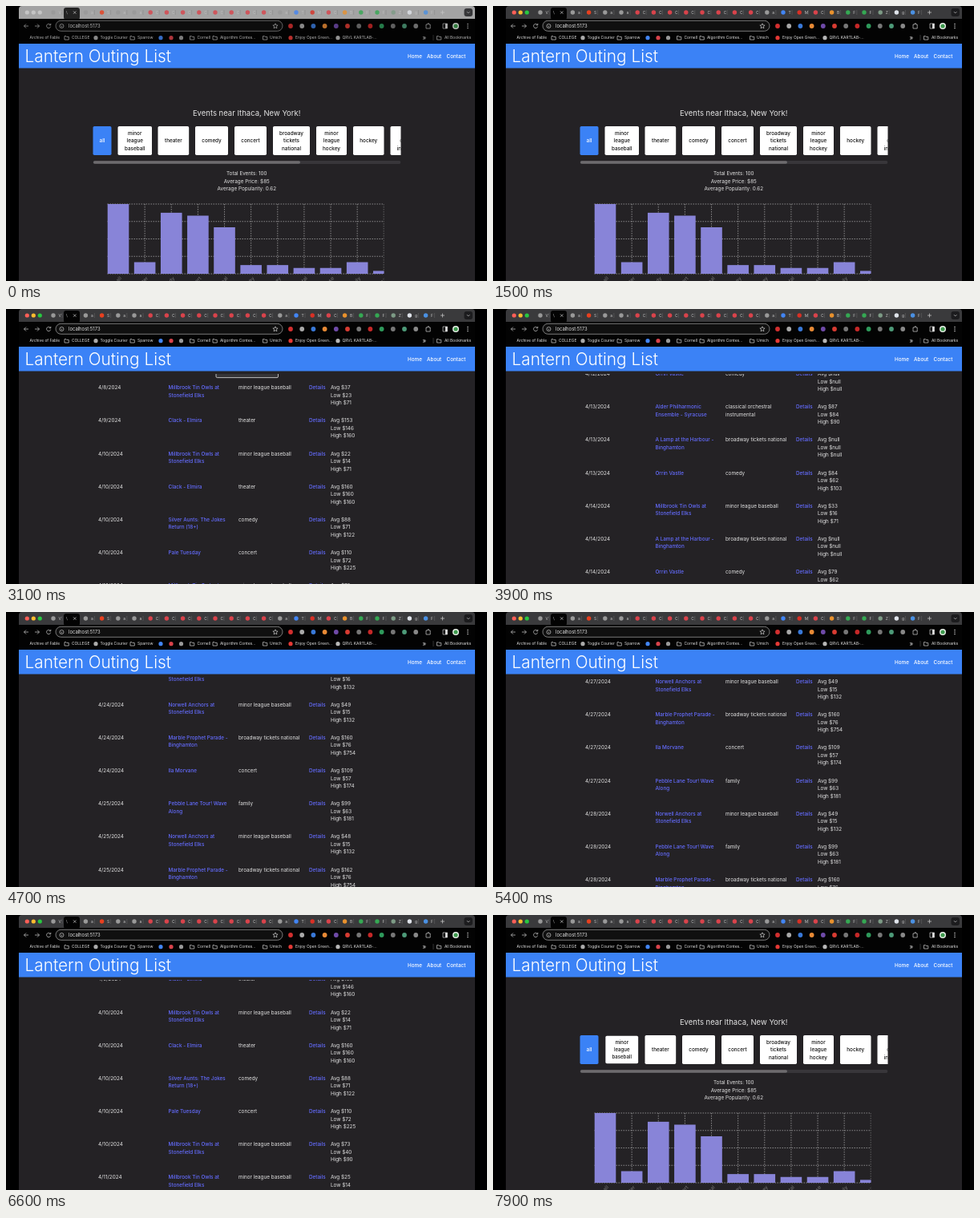
These frames come from a looping animation (600 px wide and 343 px high, 8 s). An HTML page:

```html
<!DOCTYPE html>
<html lang="en">
<head>
<meta charset="utf-8">
<title>Event list</title>
<style>
html, body { margin: 0; width: 100%; height: 100%; overflow: hidden; background: #000; }
svg { display: block; font: 6.33px Inter, "Open Sans", sans-serif; fill: #e4e4e4; }
text { white-space: pre; }
.link { fill: #646cff; font-weight: 500; }
.tile text { fill: #111; font-weight: 500; }
.line { fill: none; stroke: #d0d0d0; stroke-width: .7; }
.small { font-size: 4.9px; }
.tab { font-size: 4.9px; fill: #c4c4c4; }
</style>
</head>
<body>
<svg id="stage" width="600" height="343" viewBox="0 0 600 343"></svg>
<script>
const rect = (x, y, w, h, fill, more = '') =>
  `<rect x="${x}" y="${y}" width="${w}" height="${h}" fill="${fill}" ${more}/>`;
const dot = (x, y, r, fill) => `<circle cx="${x}" cy="${y}" r="${r}" fill="${fill}"/>`;
const text = (x, y, s, more = '') => `<text x="${x}" y="${y}" ${more}>${s}</text>`;
const path = (d, more = 'class="line"') => `<path d="${d}" ${more}/>`;
const mid = 'text-anchor="middle"';

// Browser window
function tabs() {
  const colors = ('#999 #111 #999 #e8401f #999 #999 ' + '#d9434b '.repeat(8) +
    '#999 #4285f4 #d93025 #d9434b #e8912d #35a853 #35a853 #7d9b86 #dfe3ea #4a90e2').split(' ');
  const letters = 'V aSaaCCCCCCCCaTMCBFFZgF';
  let s = rect(72, 2, 20, 15, '#030303', 'rx="3"');
  colors.forEach((c, i) => {
    const x = 59 + i * 20.2;
    if (i === 1) s += text(75, 10, '\\', 'class="tab"') + path('M84 6.4l3.4 3.4m0-3.4l-3.4 3.4');
    else s += dot(x, 8, 2.7, c) + text(x + 6.5, 9.8, letters[i], 'class="tab"') +
      path(`M${x + 11} 5v6`, 'stroke="#777" stroke-width=".4"');
  });
  return s + path('M542 8h5m-2.5-2.5v5') + rect(571.5, 3, 10.5, 10, '#1c1c1e', 'rx="3"') +
    path('M575 7.2l1.7 1.7 1.7-1.7');
}

function toolbar() {
  let s = path('M28 25h-5.5m2.5-2.5L22.5 25l2.5 2.5M36 25h5.5m-2.5-2.5l2.5 2.5-2.5 2.5M55.4 23.6a2.6 2.6 0 1 0 .3 2M55.8 21.8v2h-2') +
    rect(62, 18.3, 283, 13, '#101010', 'rx="6.5" stroke="#aaa" stroke-width=".7"') +
    '<circle class="line" cx="69.5" cy="25" r="2.5"/>' + path('M69.5 24.6v1.8') +
    text(78, 27, 'localhost:5173', 'style="font-size:5.9px"') +
    path('M336 21.8l.9 2.1 2.2.2-1.7 1.5.5 2.2-1.9-1.2-1.9 1.2.5-2.2-1.7-1.5 2.2-.2z');
  '#d32f2f #a9a9a9 #3979d8 #e88a35 #6f4aa8 #d83b32 #777 #c62828 #2e9a5b #777 #4d9a78 #888'
    .split(' ').forEach((c, i) => s += dot(355 + i * 14.2, 25, 2.9, c));
  return s + path('M524 23h2v-1.2h1.5V23h1.7v5H524zM545 22h5.5v6H545z') +
    rect(548, 22, 2.5, 6, '#ddd') + dot(561, 25, 4, '#e9efe8') + dot(561, 25, 2.6, '#3f9b4f') +
    [22.5, 25, 27.5].map(y => dot(576, y, .7, '#eee')).join('');
}

function bookmarks() {
  const items = [[29.5, 'Archive of Fable'], [82, 'COLLEGE', 73], [117.5, 'Toggle Courier'], [164, 'Sparrow', 155],
    [238.5, 'Cornell', 229.5], [267, 'Algorithm Contes...', 258], [329, 'Umich', 320.5],
    [361, 'Enjoy Open Green...'], [419.5, 'QRVL KARTLAB-...'], [547, 'All Bookmarks', 537.5]];
  return items.map(([x, s, folder]) => text(x, 41.4, s, 'class="small"') +
      (folder ? path(`M${folder} 37.6h2l.7.9h2.6v3.5h-5.3z`) : '')).join('') +
    [[112, '#aaa'], [193, '#4285f4'], [206, '#d9434b'], [218.5, '#999'], [355, '#e53935'], [414, '#b7b7b7']]
      .map(([x, c]) => dot(x, 39.7, 2.6, c)).join('') +
    text(519.5, 41.7, '»', 'style="font-size:8px"') + path('M533 36v7', 'stroke="#666" stroke-width=".5"');
}

// Page
const tile = (x, w, label, i) => {
  const lines = label.split('|');
  const c = x + w / 2;
  return `<g class="tile" id="tile${i}">` + rect(x, 150, w, 36, i ? '#fff' : '#3b82f6', 'rx="1.8"') +
    lines.map((s, k) => text(c, 170.2 + (k - (lines.length - 1) / 2) * 9.5, s,
      mid + (i ? '' : ' style="fill:#fff"'))).join('') + '</g>';
};

const tiles = () => [[108.5, 23, 'all'], [139.5, 42.5, 'minor|league|baseball'], [189.5, 38.7, 'theater'],
  [236, 41, 'comedy'], [285, 40, 'concert'], [333, 46, 'broadway|tickets|national'],
  [387, 38, 'minor|league|hockey'], [433, 38.5, 'hockey'], [479.5, 54, 'classical|orchestral|instrumental']]
  .map((t, i) => tile(...t, i)).join('');

function chart() {
  const counts = [24, 4, 21, 20, 16, 3, 3, 2, 2, 4, 1];
  const names = ['minor league baseball', 'theater', 'comedy', 'concert', 'broadway tickets national',
    'minor league hockey', 'hockey', 'classical orchestral instrumental', 'lacrosse', 'family', 'classical'];
  const center = i => 140 + i * 33.13;
  let grid = '', bars = '', labels = '';
  for (let k = 0; k < 5; k++) grid += `M126.5 ${247 + k * 21.75}H471.5`;
  counts.forEach((n, i) => {
    const x = center(i), h = n * 3.625;
    grid += `M${x} 247v87`;
    bars += rect(x - 13.3, 334 - h, 26.6, h, '#8884d8');
    labels += text(0, 0, names[i], `transform="translate(${x + 4.5} 340) rotate(-45)" text-anchor="end" fill="#777"`);
  });
  return `<g clip-path="url(#plot)">` +
    path(grid, 'fill="none" stroke="#ccc" stroke-width=".6" stroke-dasharray="1.5 1.5"') + bars + labels + '</g>';
}

const elks = ' at|Stonefield Elks';
const shows = {
  W: ['Millbrook Tin Owls' + elks, 'minor league baseball', '25 14 71'],
  S: ['Clack - Elmira', 'theater', '160 160 160'],
  G: ['Silver Aunts: The Jokes|Return (18+)', 'comedy', '88 71 122'],
  B: ['Pale Tuesday', 'concert', '110 72 225'],
  A: ['Orrin Vastle', 'comedy', '84 62 103'],
  C: ['Alder Philharmonic|Ensemble - Syracuse', 'classical orchestral|instrumental', '87 84 90'],
  P: ['A Lamp at the Harbour -|Binghamton', 'broadway tickets national', 'null null null'],
  R: ['The Vintage Riff Night', 'concert', '113 74 210'],
  D: ['Linden Foxtails at Gravel|Otters', 'minor league baseball', '47 19 100'],
  M: ['Toby Marellane', 'comedy', '112 78 168'],
  Z: ['Clive Harrowgate and|the Night Wagon', 'concert', '678 210 960'],
  K: ['Norwell Anchors' + elks, 'minor league baseball', '49 15 132'],
  J: ['Marble Prophet Parade -|Binghamton', 'broadway tickets national', '160 76 754'],
  I: ['Ila Morvane', 'concert', '109 57 174'],
  T: ['Pebble Lane Tour! Wave|Along', 'family', '99 63 181']
};
// One group of shows per day, starting on April 8
const days = 'W S WSGBW WSA WSPA CPA WPA DPM RP DP DMZ DMR DTC DJB KJR JIMK KJI TKJ KJT KJIT KTJM KJR KJI'.split(' ');
const prices = { 0: '37 23 71', 1: '153 146 160', 2: '22 14 71', 6: '73 40 90', 13: 'null null null',
  17: '33 16 71', 19: '79 62 103', 27: '47 18 100', 45: '50 16 132', 50: '48 15 132', 51: '162 76 754' };
const firstRow = 420, rowHeight = 41.17;

function table() {
  let i = 0, s = rect(262, firstRow - 27, 77.5, 14.6, '#353437', 'rx="1.5" stroke="#ddd" stroke-width=".8"');
  days.forEach((day, d) => [...day].forEach(key => {
    const y = firstRow + 2.2 + i * rowHeight;
    const [name, kind, cost] = shows[key];
    const lines = (x, list, more) => list.map((v, k) => text(x, y + k * 9.5, v, more)).join('');
    const labels = ['Avg', 'Low', 'High'];
    s += text(115, y, `4/${d + 8}/2024`) + lines(202.5, name.split('|'), 'class="link"') +
      lines(290, kind.split('|')) + text(378, y, 'Details', 'class="link"') +
      lines(405, (prices[i] || cost).split(' ').map((v, k) => `${labels[k]} $${v}`));
    i++;
  }));
  return s;
}

const stage = document.getElementById('stage');
stage.innerHTML = `<defs>
  <clipPath id="view"><rect x="16" y="81" width="569" height="262"/></clipPath>
  <clipPath id="strip"><rect x="108" y="140" width="384.5" height="60"/></clipPath>
  <clipPath id="plot"><rect x="126" y="240" width="345.5" height="150"/></clipPath></defs>` +
  rect(0, 0, 600, 343, '#000') +
  rect(16, 0, 569, 30, '#3a3a3c', 'id="bar" rx="4"') + rect(16, 16, 569, 31, '#030303') +
  [0, 1, 2].map(i => `<circle class="light" cx="${26.3 + i * 8}" cy="8" r="2.6"/>`).join('') +
  `<g id="chrome">${tabs()}${toolbar()}${bookmarks()}</g>` +
  rect(16, 47, 569, 296, '#242225') + rect(16, 47, 569, 30.5, '#3b82f6') +
  text(23.5, 70.2, 'Lantern Outing List', 'style="font-size:20.8px;font-weight:300" fill="#fff"') +
  [[501, 'Home'], [525, 'About'], [549.5, 'Contact']]
    .map(([x, s]) => text(x, 64.8, s, 'font-weight="500" fill="#fff"')).join('') +
  '<g clip-path="url(#view)"><g id="page">' +
  text(300.2, 137.4, 'Events near Ithaca, New York!', mid + ' style="font-size:9.5px"') +
  `<g clip-path="url(#strip)">${tiles()}` + rect(108.5, 193, 384, 4, '#38363a', 'rx="2"') +
  rect(109, 193.3, 258, 3.4, '#6d6b6e', 'rx="1.7"') + '</g>' +
  ['Total Events: 100', 'Average Price: $85', 'Average Popularity: 0.62']
    .map((s, i) => text(300.3, 211.3 + i * 9.5, s, mid)).join('') +
  chart() + table() + '</g></g>';

// Scroll position: monotone cubic through [time, offset]
const rowAt = (i, y) => firstRow + i * rowHeight - y;
const keys = [[0, 0], [2600, 0], [2700, 9.5], [3100, rowAt(0, 98)], [3900, rowAt(14, 122)],
  [4700, rowAt(46, 115.5)], [5250, 2680], [6100, rowAt(23, 92)], [7000, 0], [8000, 0]];
const slope = i => keys[i + 1] ? (keys[i + 1][1] - keys[i][1]) / (keys[i + 1][0] - keys[i][0]) : 0;
const tangent = i => {
  const a = i ? slope(i - 1) : 0, b = slope(i);
  return a * b > 0 ? 2 * a * b / (a + b) : 0;
};
function scrollAt(t) {
  const i = keys.findLastIndex(k => k[0] <= t), [t0, a] = keys[i], [t1, b] = keys[i + 1];
  const d = t1 - t0, u = (t - t0) / d, v = 1 - u;
  return a * v * v * (1 + 2 * u) + b * u * u * (3 - 2 * u) + d * u * v * (tangent(i) * v - tangent(i + 1) * u);
}

const get = id => document.getElementById(id);
const lights = document.querySelectorAll('.light');
const start = performance.now();
function draw(now) {
  const t = Math.floor(Math.max(0, now - start) % 8000 / 100) * 100;
  const active = t >= 1300;
  get('bar').setAttribute('fill', active ? '#3a3a3c' : '#a3a3a3');
  get('chrome').setAttribute('opacity', active ? 1 : .8);
  lights.forEach((el, i) => el.setAttribute('fill', active ? ['#ff5f57', '#febc2e', '#28c840'][i] : '#c4c4c4'));
  get('page').setAttribute('transform', `translate(0 ${-scrollAt(t)})`);
  get('tile1').setAttribute('transform', t >= 7800 ? 'translate(160.75 168) scale(.96) translate(-160.75 -168)' : '');
  requestAnimationFrame(draw);
}
draw(start);
</script>
</body>
</html>
```
